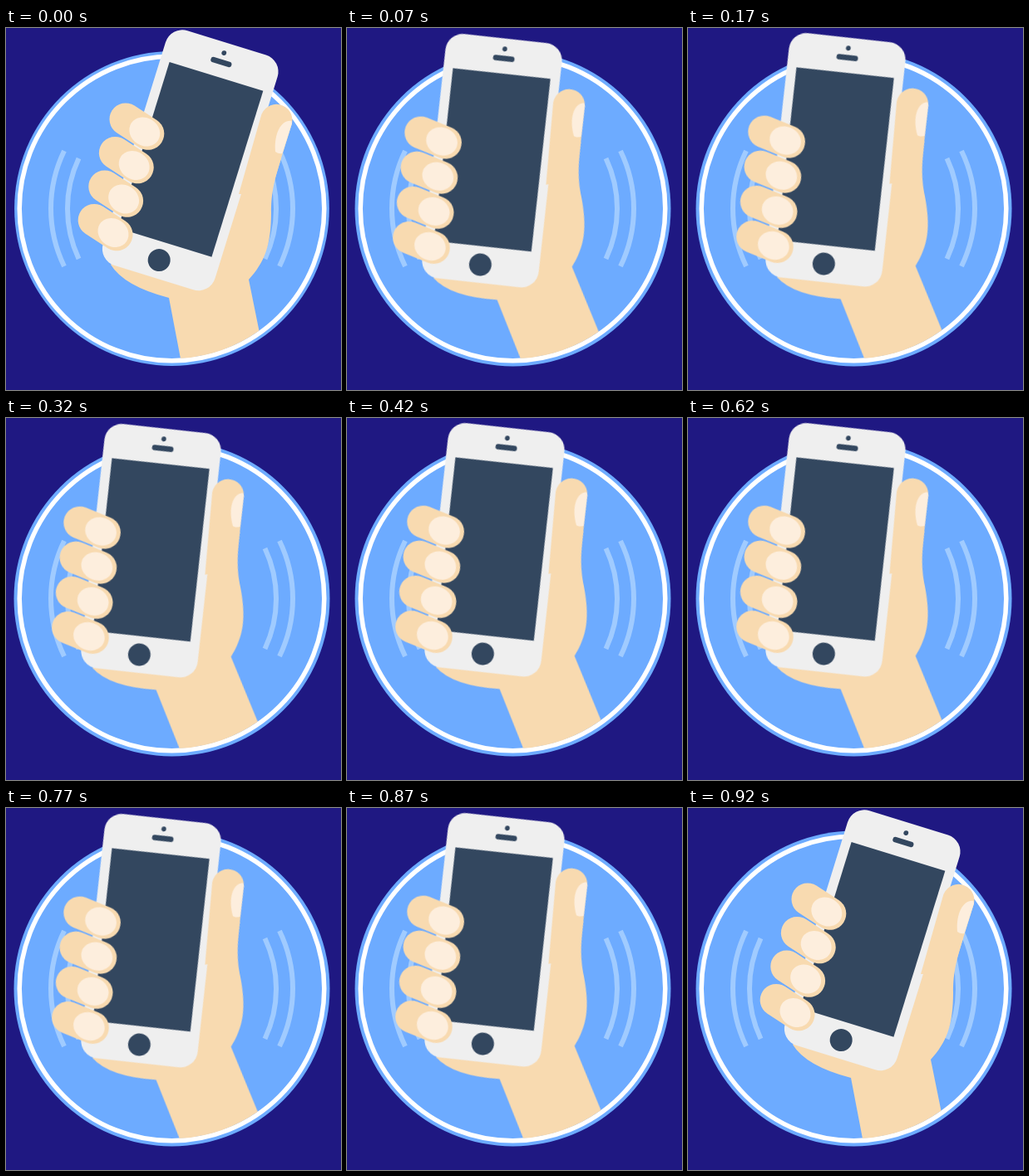
Animation of 403 by 436 pixels, one loop 3.47 s. Source, as an HTML page:

```html
<!DOCTYPE html>
<html lang="en">
<head>
<meta charset="utf-8">
<title>Shaking phone</title>
<style>
  html, body { margin: 0; width: 100%; height: 100%; overflow: hidden; background: #1f1882; }
  svg { display: block; }
  .wave { fill: none; stroke: #a0cbff; stroke-width: 6; }
  .skin { fill: #f8dab0; }
  .nail { fill: #fdeedd; }
  .dark { fill: #33475f; }
  #arm { transform-origin: 201px 405px; }
</style>
</head>
<body>
<svg width="403" height="436" viewBox="0 0 403 436">
  <defs>
    <!-- the phone may leave the badge at the top, the wrist ends at the ring -->
    <clipPath id="badge">
      <rect width="403" height="300"/>
      <circle cx="199.5" cy="217.5" r="180.7"/>
    </clipPath>
    <g id="waves" class="wave">
      <path d="M70 148A159 159 0 0 0 70 287"/>
      <path d="M87.500 157A142 142 0 0 0 87.500 278"/>
    </g>
    <g id="finger">
      <rect class="skin" x="-35.500" y="-19.500" width="71" height="39" rx="19.500"/>
      <ellipse class="nail" cx="11.400" cy="0.300" rx="19.200" ry="16.700"/>
    </g>
  </defs>

  <circle id="disc" cx="199.500" cy="217.500" r="190" fill="#6dabff"/>
  <circle cx="199.500" cy="217.500" r="183.300" fill="none" stroke="#fff" stroke-width="5.500"/>
  <use href="#waves"/>
  <use href="#waves" transform="matrix(-1 0 0 1 399 0)"/>

  <g clip-path="url(#badge)">
    <g id="arm">
      <!-- palm and wrist -->
      <path class="skin" d="M300 150L331 157C321 188 319 203 319 222C319 262 311 282 292 303
        L314.500 414L213 414L196 325Q142 311 126 285L200 200Z"/>
      <g transform="translate(222.500 158.500) rotate(17.200)">
        <rect x="-71" y="-147" width="141" height="296" rx="21" fill="#efefef"/>
        <rect class="dark" x="-59.500" y="-104.700" width="118" height="209.400"/>
        <rect class="dark" x="-13" y="-126.200" width="26" height="6.500" rx="3.250"/>
        <circle class="dark" cy="-134.400" r="2.900"/>
        <circle class="dark" cx="-0.800" cy="127" r="13.500"/>
      </g>
      <!-- thumb lies on the edge of the phone -->
      <path class="skin" d="M306.500 107A19 19 0 0 1 344 115L331 157L318 200L280 200Z"/>
      <path class="nail" d="M343.500 112C332 110 322 126 324 149Q328 152 332.500 151L344 115Z"/>
      <g id="fingers"></g>
    </g>
  </g>
</svg>
<script>
const LOOP = 3470, FIRST = 70, STEP = 50;
const $ = id => document.getElementById(id);

for (let i = 0; i < 4; i++) {
  const use = document.createElementNS('http://www.w3.org/2000/svg', 'use');
  use.setAttribute('href', '#finger');
  use.setAttribute('transform',
    `translate(${157.4 - 12.6 * i} ${118.6 + 40.5 * i}) rotate(33)`);
  $('fingers').append(use);
}

// R: resting right, C: moving left, L: upright, B: moving back
const poses = { R: [0, 0, 0], C: [-0.4, 0, -10.9], L: [-1, 0, -17.2], B: [2.6, -1, -10.9] };
const swing = 'RCLBRRCLB';
const sequence = swing + swing + 'R';

function transformOf(key) {
  const [x, y, angle] = poses[key];
  return `translate(${x}px, ${y}px) rotate(${angle}deg)`;
}

const timeOf = i => i ? FIRST + (i - 1) * STEP : 0;
const frames = [...sequence].map((key, i) => ({
  offset: timeOf(i) / LOOP, transform: transformOf(key), easing: 'step-end'
}));
frames.push({ offset: 1, transform: transformOf('R') });

const timing = { duration: LOOP, iterations: Infinity };
const moves = [
  $('arm').animate(frames, timing),
  $('disc').animate([
    { offset: 0, r: '189.4px', easing: 'step-end' },
    { offset: FIRST / LOOP, r: '190px' },
    { offset: 1, r: '190px' }
  ], timing)
];
for (const move of moves) move.startTime = 0;
</script>
</body>
</html>
```
